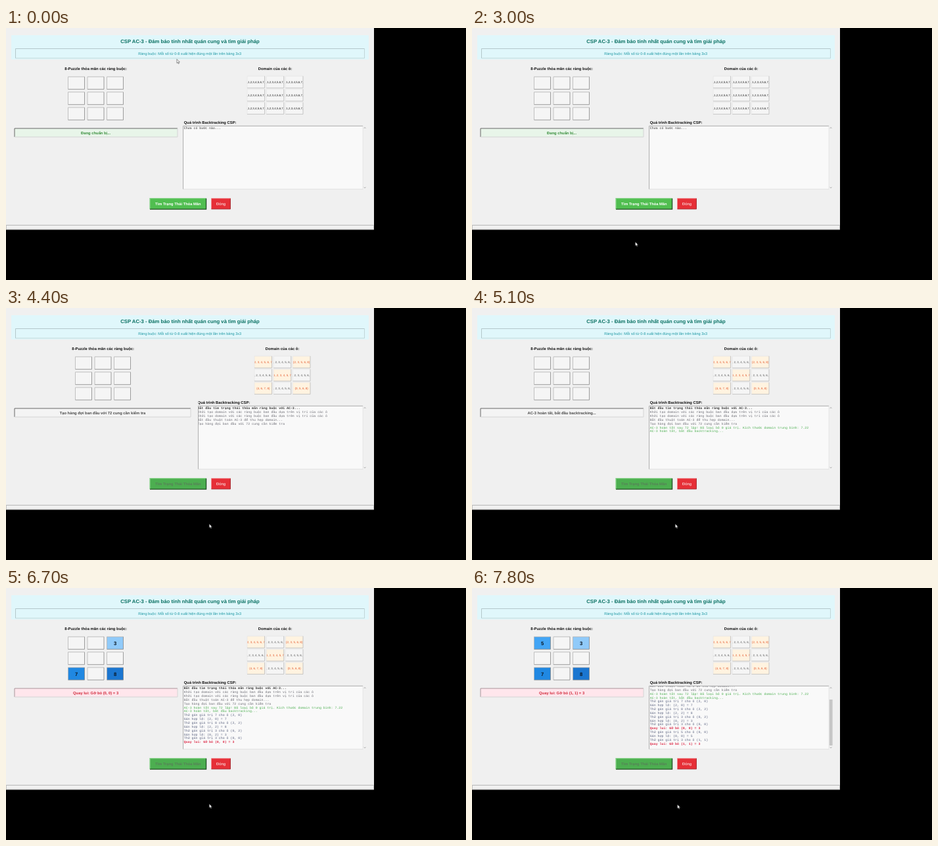
Write an HTML page that moves like this. It is 700 px wide and 384 px high and loops after 8000 ms.

```html
<!DOCTYPE html>
<html lang="vi">
<head>
<meta charset="utf-8">
<title>CSP AC-3</title>
<style>
  html, body { margin: 0; width: 100%; height: 100%; overflow: hidden; background: #000; }
  svg { display: block; }
  text { font-family: "Liberation Sans", Arial, sans-serif; text-rendering: geometricPrecision; white-space: pre; }
  .mono { font-family: "Liberation Mono", "Courier New", monospace; }
</style>
</head>
<body>
<svg id="stage" width="700" height="384" viewBox="0 0 700 384"></svg>
<script>
const LOOP = 8000, STEP = 100;
const stage = document.getElementById('stage');

const tryOf = (v, r, c) => [`Thử gán giá trị ${v} cho ô (${r}, ${c})`, '#5c6480'];
const setOf = (v, r, c) => [`Gán hợp lệ: (${r}, ${c}) = ${v}`, '#5c6480'];
const undoOf = (v, r, c) => [`Quay lui: Gỡ bỏ (${r}, ${c}) = ${v}`, '#dc2846', true];
const init = ['Khởi tạo domain với các ràng buộc ban đầu dựa trên vị trí của các ô', '#6c6c74'];

const LOG = [
  ['Bắt đầu tìm trạng thái thỏa mãn ràng buộc với AC-3...', '#333', true],
  init, init,
  ['Bắt đầu thuật toán AC-3 để thu hẹp domain...', '#6c6c74'],
  ['Tạo hàng đợi ban đầu với 72 cung cần kiểm tra', '#6c6c74'],
  ['AC-3 hoàn tất sau 72 lặp! Đã loại bỏ 0 giá trị. Kích thước domain trung bình: 7.22', '#4caf50'],
  ['AC-3 hoàn tất, bắt đầu backtracking...', '#4caf50'],
  tryOf(7, 2, 0), setOf(7, 2, 0),
  tryOf(8, 2, 2), setOf(8, 2, 2),
  tryOf(3, 0, 2), setOf(3, 0, 2),
  tryOf(3, 0, 0), undoOf(3, 0, 0),
  tryOf(5, 0, 0), setOf(5, 0, 0),
  tryOf(3, 1, 1), undoOf(3, 1, 1)
];

// time, log lines, index of the status line, filled cells, layout shift
const STATES = [
  [0, 0, -1, '', 0],
  [4100, 1, 0, '', 0],
  [4200, 3, 1, '', 0],
  [4300, 4, 3, '', 1],
  [4400, 5, 4, '', 1],
  [5100, 7, 6, '', 0],
  [5200, 9, 8, '7', 0],
  [5600, 11, 10, '7', 0],
  [5700, 11, 10, '78', 0],
  [6200, 13, 12, '783', 0],
  [6700, 15, 14, '783', 0],
  [7200, 16, 16, '783', 0],
  [7300, 17, 16, '7835', 0],
  [7800, 19, 18, '7835', 0]
];

// time, x, y of the pointer tip
const POINTER = [
  [0, 260, 47.5], [100, 330, 19], [200, 430, 60], [300, 520, 150], [400, 562, 266],
  [500, 556, 220], [600, 550, 177], [1800, 308.5, 310], [2300, 340, 338], [2400, 400, 366],
  [2500, 437, 376], [2600, 400, 378], [2700, 340, 370], [2800, 290, 350], [2900, 260, 335],
  [3000, 248.5, 326], [3100, 246, 328], [3200, 250, 300], [3300, 262, 268], [3400, 278, 270],
  [3500, 307.5, 274], [3800, 329, 300], [3900, 309.3, 329], [6800, 312, 329.5], [7000, 312.6, 330]
];

const TILES = { 5: [0, 0, '#42a5f5'], 3: [0, 2, '#90caf9'], 7: [2, 0, '#2088e2'], 8: [2, 2, '#1b76d0'] };
const FULL = ['{0, 1, 2, 3, 4, 5, 6, 7, 8}', 0];
const DOMAINS = [
  ['2, 3, 4, 5, 6, 7', 1], FULL, ['{2, 3, 5, 6, 8}', 1],
  FULL, ['1, 2, 3, 4, 5, 7', 1], FULL,
  ['{4, 6, 7, 8}', 1], FULL, ['{0, 5, 6, 8}', 1]
];

const at = (table, t) => table.filter(row => row[0] <= t).pop();

const rect = (x, y, w, h, fill) =>
  `<rect x="${x}" y="${y}" width="${w}" height="${h}" fill="${fill}"/>`;

function box(x, y, w, h, fill, tl, br, lw = 0.8) {
  const r = x + w, b = y + h;
  return rect(x, y, w, h, fill) +
    `<path d="M${x} ${b}V${y}H${r}" fill="none" stroke="${tl}" stroke-width="${lw}"/>` +
    `<path d="M${x} ${b}H${r}V${y}" fill="none" stroke="${br}" stroke-width="${lw}"/>`;
}

// y is the middle of the capitals
function text(str, x, y, size, fill, { bold, anchor = 'middle', mono } = {}) {
  return `<text x="${x}" y="${y + size * 0.35}" font-size="${size}" fill="${fill}" text-anchor="${anchor}"` +
    `${bold ? ' font-weight="700"' : ''}${mono ? ' class="mono"' : ''}>${str}</text>`;
}

const clip = (x, y, w, h, inner) =>
  `<svg x="${x}" y="${y}" width="${w}" height="${h}" viewBox="${x} ${y} ${w} ${h}" overflow="hidden">${inner}</svg>`;

const B = { bold: true };

function header() {
  return rect(0, 0, 560, 307.3, '#f0f0f0') +
    rect(8, 11, 544, 37, '#e0f7fb') +
    text('CSP AC-3 - Đảm bảo tính nhất quán cung và tìm giải pháp', 280, 20, 7.72, '#0b7163', B) +
    box(14.5, 31.5, 531, 14.5, '#e0f7fb', '#a9bcbf', '#b9cdd0') +
    text('Ràng buộc: Mỗi số từ 0-8 xuất hiện đúng một lần trên bảng 3x3', 279.7, 39, 5.6, '#1c97a3') +
    box(0.3, 300.5, 559.2, 6.3, '#f0f0f0', '#b0b0b0', '#c8c8c8', 0.9);
}

function puzzle(filled, dx) {
  let out = text('8-Puzzle thỏa mãn các ràng buộc:', 136.7 + dx, 61.8, 5.88, '#111', B);
  for (let i = 0; i < 9; i++) {
    const r = i / 3 | 0, c = i % 3;
    const x = 94.5 + dx + c * 29.5, y = 74.3 + r * 23.4;
    const key = [...filled].find(k => TILES[k][0] === r && TILES[k][1] === c);
    out += box(x, y, 25, 19, key ? TILES[key][2] : '#f5f5f5', '#b4b4b4', '#868686');
    if (key) out += text(key, x + 12.6, y + 9.8, 7.7, '#0a1622', B);
  }
  return out;
}

function domains(active, dx) {
  let out = text('Domain của các ô:', 409.5 + dx, 61.8, 5.85, '#111', B);
  DOMAINS.forEach(([str, cut], i) => {
    const x = 367 + dx + (i % 3) * 29.2, y = 73.3 + (i / 3 | 0) * 20;
    const hot = active && cut;
    const label = active ? str : '0,1,2,3,4,5,6,7,8';
    out += box(x, y, 26.6, 18, hot ? '#fff3e0' : '#f5f5f5', '#e6e6e6', '#b2b2b2', 0.7) +
      clip(x + 0.3, y, 26.2, 18, text(label, x + 13.3, y + 9.2, 4.45, hot ? '#e2572b' : active ? '#555' : '#222'));
  });
  return out;
}

function status(i, shift) {
  const w = shift ? 268 : 248;
  const [str, , undo] = i < 0 ? ['Đang chuẩn bị...'] : LOG[i];
  const red = undo && i > 0;
  const fill = i < 0 ? '#e8f5e9' : red ? '#ffe6ec' : '#f4f4f4';
  const ink = i < 0 ? '#388e3c' : red ? '#d22a3c' : '#4a4a4a';
  return box(13, 153, w, 13, fill, red ? '#a8949a' : '#666', '#d4d4d4', 1) +
    text(str, 13 + w / 2 - (shift ? 0 : 0.4), 159.6, 5.83, ink, B);
}

function logPanel(n, shift) {
  const left = shift ? 292.6 : 269.6, x = shift ? 291.6 : 270.8;
  const pitch = 5.85, top = 152.6;
  const scroll = Math.max(0, top + (n - 1) * pitch - 237);
  const lines = n ? LOG.slice(0, n) : [['Chưa có bước nào...', '#333']];
  const body = lines.map(([str, fill, bold], i) =>
    text(str, x, top + i * pitch - scroll, 4.91, fill, { bold, anchor: 'start', mono: true })).join('');
  let out = clip(left, 138, 250, 11,
    text('Quá trình Backtracking CSP:', x, 144, 5.83, '#111', { bold: true, anchor: 'start' }));
  out += box(left, 149.3, 543.2 - left, 96.3, '#f9f9f9', '#9a9a9a', '#dcdcdc') +
    clip(left + 0.4, 149.8, 543 - left, 95.4, body) +
    rect(543.5, 149.3, 5.6, 96.3, '#f0f0f0');
  if (scroll) {
    const y = n > 17 ? 170 : n > 16 ? 163 : 158;
    out += rect(543.8, y, 4.8, 240 - y, '#c6c6c6');
  }
  return out + '<path d="M544.7 153l1.4-1.6 1.4 1.6M544.7 242.4l1.4 1.6 1.4-1.6" fill="none" stroke="#888" stroke-width=".6"/>';
}

function buttons(t) {
  const off = t >= 4100, down = t === 3300;
  const light = '#8ad48c', dark = '#234f25';
  return box(219, 259.7, 85.6, 16.4, off ? '#4cae50' : '#50be50',
      down ? dark : light, down ? light : dark, 1.3) +
    text('Tìm Trạng Thái Thỏa Mãn', 261.8, 268, 5.78, off ? '#587f59' : '#fff', B) +
    box(312.5, 259.7, 29, 16.2, '#e62f37', '#f28a8e', '#a3282e', 0.9) +
    text('Đóng', 327, 268, 5.9, '#fff');
}

const pointer = (x, y) =>
  `<path transform="translate(${x} ${y})" d="M0 0V6L1.4 4.8 2.4 7 3.4 6.5 2.5 4.4H4.3Z" fill="#fff" stroke="#222" stroke-width=".5"/>`;

function draw(t) {
  const [, n, stat, filled, shift] = at(STATES, t);
  const [, px, py] = at(POINTER, t);
  const dx = shift * 11;
  stage.innerHTML = header() + puzzle(filled, dx) + domains(t >= 4200, dx) +
    status(stat, shift) + logPanel(n, shift) + buttons(t) + pointer(px, py);
}

const start = performance.now();
let last = -1;
function tick() {
  const t = Math.floor((performance.now() - start) % LOOP / STEP) * STEP;
  if (t !== last) draw(last = t);
  requestAnimationFrame(tick);
}
tick();
</script>
</body>
</html>
```
